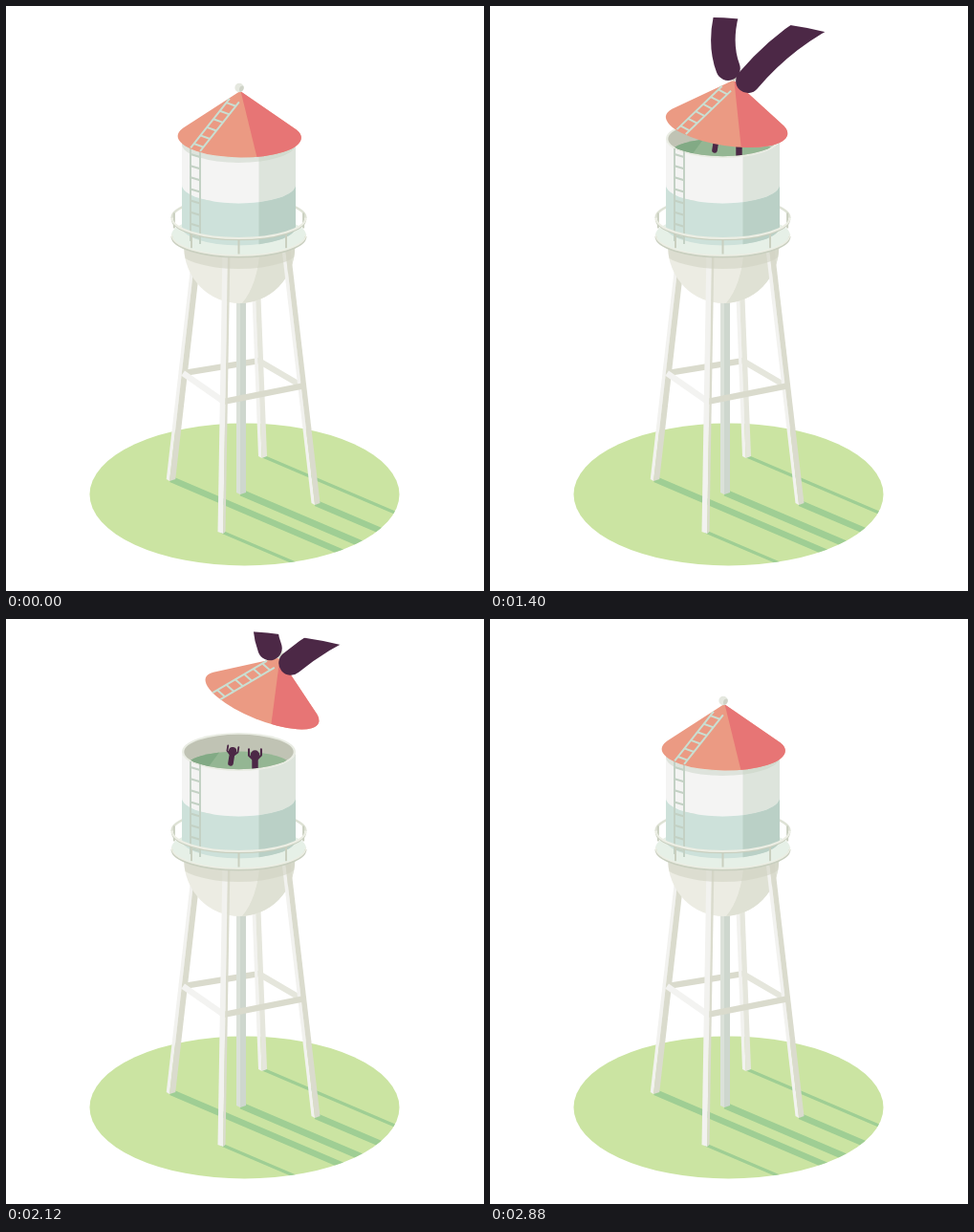
These frames come from a looping animation (500x612 px, 4.08 s). An HTML page with a canvas:

```html
<!DOCTYPE html>
<html lang="en">
<head>
<meta charset="utf-8">
<title>Water tower</title>
<style>
html, body { margin: 0; width: 100%; height: 100%; overflow: hidden; background: #fff; }
canvas { display: block; width: 500px; height: 612px; }
</style>
</head>
<body>
<canvas id="stage" width="500" height="612"></canvas>
<script>
const c = document.getElementById('stage').getContext('2d');
const LOOP = 4080, STEP = 40, TAU = Math.PI * 2, DEG = Math.PI / 180;
const DARK = '#4c2846', LIGHT = '#f2f2ef', STONE = '#dadbcd', MILK = '#e5e6dc';
const CX = 243.5;          // axis of the tank
const LEG_TOP = 254, BRACE = 0.54, SUN = 0.427;

const clamp = v => Math.max(0, Math.min(1, v));
const mix = (a, b, k) => a + (b - a) * k;
const mixPt = (a, b, k) => [mix(a[0], b[0], k), mix(a[1], b[1], k)];
const easeOut = (k, n) => 1 - Math.pow(1 - k, n);

function trace(pts) {
  c.beginPath();
  for (const p of pts) c.lineTo(...p);
}
function poly(color, ...pts) {
  trace(pts);
  c.fillStyle = color;
  c.fill();
}
function line(color, width, ...pts) {
  trace(pts);
  c.strokeStyle = color;
  c.lineWidth = width;
  c.stroke();
}
function oval(color, x, y, rx, ry = rx) {
  c.beginPath();
  c.ellipse(x, y, rx, ry, 0, 0, TAU);
  c.fillStyle = color;
  c.fill();
}
function scoped(draw) {
  c.save();
  draw();
  c.restore();
}
function ladder(color, a, b, gap, rungs) {
  const side = ([x, y]) => [x + gap[0], y + gap[1]];
  line(color, 2, a, b);
  line(color, 2, side(a), side(b));
  for (let i = 0; i < rungs; i++) {
    const p = mixPt(a, b, (i + 0.5) / rungs);
    line(color, 2, p, side(p));
  }
}

// split: share of the width taken by the lit face
const legs = {
  back: { top: 260, foot: [268.5, 471], w: 9, split: 0.4, shade: 3.2, dark: MILK },
  pipe: { top: 246, foot: [246, 509], w: 10, split: 0.4, shade: 7, lit: '#dbe1d9', dark: '#ced7ce' },
  left: { top: 200, foot: [172.5, 495], w: 9.5, split: 0.35, shade: 6.5 },
  right: { top: 293, foot: [324, 520], w: 9, split: 0.4, shade: 6.5 },
  front: { top: 230.5, foot: [225.5, 550], w: 8, split: 0.7, shade: 3.2 },
};

function leg({ top, foot: [x, y], w, split, lit = LIGHT, dark = STONE }) {
  const edge = k => [[top + (k - 0.5) * w, LEG_TOP], [x + (k - 0.5) * w, y]];
  const [a, b] = edge(0), [m, n] = edge(split), [d, e] = edge(1);
  n[1] += 2;
  poly(lit, a, m, n, b);
  poly(dark, m, d, e, n);
}
function brace(color, a, b) {
  const joint = l => mixPt([l.top, LEG_TOP], l.foot, BRACE);
  line(color, 6.3, joint(a), joint(b));
}

function ground() {
  scoped(() => {
    oval('#cbe4a2', 249.5, 511, 162, 74.5);
    c.clip();
    for (const { foot: [x, y], shade } of Object.values(legs))
      line('#9fce94', shade, [x, y], [x + 220, y + 220 * SUN]);
  });
}

function bowl(color) {
  c.beginPath();
  c.ellipse(CX + 0.7, 252, 58, 59, 0, 0, Math.PI);
  c.fillStyle = color;
  c.fill();
}

function frame() {
  const { back, pipe, left, right, front } = legs;
  brace(STONE, left, back);
  brace(MILK, back, right);
  leg(back);
  leg(pipe);
  leg(left);
  bowl('#ecece3');
  scoped(() => {
    c.clip();
    c.beginPath();
    c.moveTo(266, 245);
    c.quadraticCurveTo(265, 292, 245, 313);
    c.lineTo(310, 313);
    c.lineTo(310, 245);
    c.fillStyle = '#dfe1d4';
    c.fill();
  });
  leg(right);
  brace('#f3f3f1', left, front);
  brace(STONE, front, right);
  leg(front);
  scoped(() => {
    bowl('transparent');
    c.clip();
    oval('rgba(208,209,193,.55)', CX, 254, 64, 21);
  });
}

// Strip around the front of the tank.
function band(color, top, bottom, ry = 19.5) {
  c.beginPath();
  c.ellipse(CX, top, 59.5, ry, 0, 0, Math.PI);
  c.ellipse(CX, bottom, 59.5, ry, 0, Math.PI, 0, true);
  c.fillStyle = color;
  c.fill();
}

function person(x, y, size, tilt) {
  scoped(() => {
    c.translate(x, y);
    c.rotate(tilt * DEG);
    c.scale(size, size);
    c.lineJoin = c.lineCap = 'round';
    line(DARK, 5.6, [0, 0], [0, -8]);
    oval(DARK, 0, -13, 4.1);
    for (const s of [-1, 1])
      line(DARK, 1.8, [s * 2, -9], [s * 5.6, -12.5], [s * 5.6, -18]);
  });
}

function opening(t) {
  oval('#e9ece3', CX, 139, 59.5, 20);
  scoped(() => {
    oval('#c0c3b4', CX, 139, 57.2, 18.2);
    c.clip();
    oval('#94b693', CX, 155, 56, 16.5);
    scoped(() => {
      c.clip();
      poly('#82aa85', [180, 130], [230, 130], [208, 160], [180, 160]);
    });
    const sway = Math.cos((t - 1560) / 400 * TAU);
    person(235, 151, 1, -11 * sway);
    person(260.5, 157, 1.15, 8 + 10 * sway);
  });
}

function tank(t, closed) {
  const walls = (upper, lower) => {
    band(upper, 139, 187);
    band(lower, 187, 231);
  };
  walls('#f4f4f3', '#cde1da');
  scoped(() => {
    c.beginPath();
    c.rect(264.5, 100, 60, 160);
    c.clip();
    walls('#dde4dc', '#bad0c6');
  });
  opening(t);
  if (closed) band('rgba(196,206,190,.45)', 139, 144.5);
  ladder('#c3d1c4', [193, 149], [193, 246], [10, 3], 8);
}

function hoop(color, width, y, from, to) {
  c.beginPath();
  c.ellipse(CX, y, 70, 21.5, 0, from, to);
  c.strokeStyle = color;
  c.lineWidth = width;
  c.stroke();
}

function balconyBack() {
  hoop('#dee2d5', 2.5, 222, Math.PI, TAU);
  oval('#e6f0e7', CX, 240, 70.5, 22);
}

function balconyFront() {
  hoop('#c9cfbf', 2, 241, 0, Math.PI);
  hoop('#eceee4', 1.5, 239.5, 0, Math.PI);
  for (const a of [-15, 45, 90, 135, 195]) {
    const x = CX + 70 * Math.cos(a * DEG), y = 222 + 21.5 * Math.sin(a * DEG);
    line('#c9cfbf', 2, [x, y], [x, y + 16]);
  }
  hoop('#c9cfbf', 1.5, 223, 0, Math.PI);
  hoop('#eceee4', 2.2, 221.5, 0, Math.PI);
}

// Drawn around its tip.
function roof(lift, tilt) {
  scoped(() => {
    c.translate(mix(245, 286, lift), mix(89, 40.5, lift));
    c.rotate(tilt * DEG);
    scoped(() => {
      c.beginPath();
      c.moveTo(0, 0);
      c.ellipse(0, 48, mix(64.5, 63.5, lift), mix(21.5, 20.5, lift), 0, -0.4, Math.PI + 0.4);
      c.closePath();
      c.fillStyle = '#eb9a83';
      c.fill();
      c.clip();
      poly('#e77575', [0, -2], [20, 75], [80, 75], [80, -2]);
    });
    ladder('#c9dfd2', [-51, 60], [-11, 8], [10, 3.5], 6);
    oval('#e5e8df', -1, -3.5, 4.7);
    scoped(() => {
      c.clip();
      oval('#cfd3c7', 3, -1.5, 4);
    });
  });
}

function arms([lx, ly], [rx, ry]) {
  scoped(() => {
    c.beginPath();
    c.arc(215, 611, 599.5, 0, TAU);
    c.clip();
    c.lineCap = c.lineJoin = 'round';
    c.strokeStyle = DARK;
    c.lineWidth = 25.5;

    c.beginPath();
    c.moveTo(lx, ly);
    c.quadraticCurveTo(lx - 12, ly - 32, lx + 4, ly - 75);
    c.lineTo(lx + 40, ly - 200);
    c.stroke();

    const dx = 367 - rx, dy = 4 - ry, bow = 0.0009 * Math.hypot(dx, dy);
    c.beginPath();
    c.moveTo(rx, ry);
    c.quadraticCurveTo(rx + dx / 2 + dy * bow, ry + dy / 2 - dx * bow, rx + dx, ry + dy);
    c.stroke();
  });
}

function reach(t) {
  if (t < 840) return 0;
  if (t < 1000) return easeOut((t - 800) / 200, 1.35);
  return 1 - clamp((t - 2520) / 360);
}

function draw(t) {
  const k = clamp(Math.min(t - 1360, 2520 - t) / 240);
  const lift = easeOut(k, 1.5), tilt = mix(0.8, 22, easeOut(k, 2.5));
  const grab = reach(t);

  c.fillStyle = '#fff';
  c.fillRect(0, 0, 500, 612);
  ground();
  frame();
  balconyBack();
  tank(t, k === 0);
  balconyFront();
  roof(lift, tilt);
  if (grab > 0) {
    const left = mixPt([240.5, 76], [276, 30.5], lift);
    const right = mixPt([261, 88.5], [298, 46], lift);
    arms(mixPt([178, -90], left, grab), mixPt([358, 3], right, grab));
  }
}

const start = performance.now();
function tick() {
  const t = (performance.now() - start) % LOOP;
  draw(Math.floor(t / STEP) * STEP);
  requestAnimationFrame(tick);
}
tick();
</script>
</body>
</html>
```
